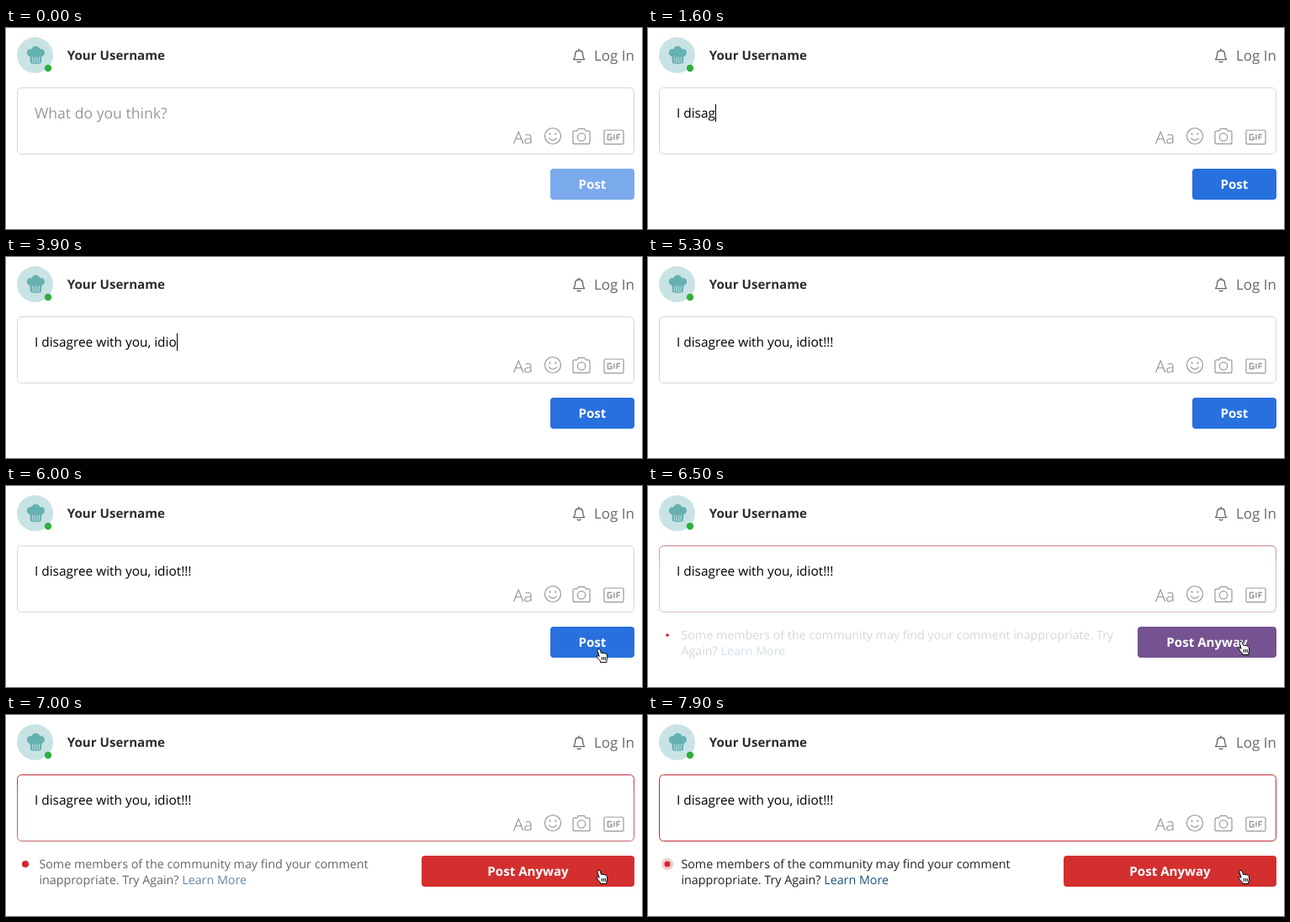
Animation of 756 by 240 pixels, one loop 8 s. Source, as an HTML page:

```html
<!DOCTYPE html>
<html lang="en">
<head>
<meta charset="utf-8">
<title>Comment box</title>
<style>
  html, body { margin: 0; width: 100%; height: 100%; overflow: hidden; background: #fff; }
  svg { display: block; width: 756px; height: 240px; }
  text { font-family: "Open Sans", "Noto Sans", sans-serif; text-rendering: geometricPrecision; white-space: pre; }
  .bold { font-weight: 700; font-size: 15.1px; }
  .icon { fill: none; stroke: #999; stroke-width: 1.2; stroke-linecap: round; stroke-linejoin: round; }
  #message { font-size: 14.3px; fill: #222; }
  #message .link { fill: #1c5480; }
</style>
</head>
<body>
<svg viewBox="0 0 756 240">
  <!-- header -->
  <circle cx="34.5" cy="32.5" r="21.5" fill="#c9e3e4"/>
  <g fill="#65b1b2">
    <circle cx="29.3" cy="29.5" r="4.6"/>
    <circle cx="35.3" cy="26.6" r="5.2"/>
    <circle cx="41.4" cy="29.5" r="4.6"/>
    <path d="M28 28H43L41.7 42Q35.3 44.2 29 42Z"/>
  </g>
  <path d="M31.4 34.5L32 41.5M34.2 34.5V42M36.8 34.5V42M39.6 34.5L39 41.5" stroke="#c9e3e4" stroke-width=".9"/>
  <circle cx="50" cy="48" r="4.2" fill="#2fae40"/>
  <text class="bold" x="72.8" y="38" fill="#2b2d31">Your Username</text>
  <path class="icon" style="stroke:#65686c;stroke-width:1.4" d="M681 25.3V27M674.6 37.6H687.6C685.8 35.9 685.6 34 685.6 31.4C685.6 28.6 683.7 27 681.1 27S676.6 28.6 676.6 31.4C676.6 34 676.4 35.9 674.6 37.6ZM679.2 40.1Q681.1 41.4 683 40.1"/>
  <text x="699" y="39" font-size="17" fill="#66696d">Log In</text>

  <!-- input -->
  <rect x="13.5" y="71.5" width="733" height="79" rx="5" fill="#fff" stroke="url(#edge)"/>
  <defs>
    <linearGradient id="edge" x1="0" y1="0" x2="0" y2="1">
      <stop id="edgeTop" offset="0"/>
      <stop id="edgeEnd" offset=".3"/>
    </linearGradient>
  </defs>
  <text id="hint" x="34" y="108" font-size="17.6" fill="#999">What do you think?</text>
  <text id="typed" x="34" y="107" font-size="15.4" fill="#000"></text>
  <rect id="caret" y="91" width="1" height="21" fill="#000"/>

  <!-- tools -->
  <text x="603" y="138" font-size="20.6" font-weight="300" fill="#888">Aa</text>
  <g class="icon">
    <circle cx="650" cy="129" r="9.5"/>
    <path d="M645.5 131.7Q650 136.4 654.5 131.7"/>
    <path d="M646.6 126.3V126.8M653.4 126.3V126.8" stroke-width="1.9"/>
    <path d="M676 122.8H679L680.4 120.3H687.6L689 122.8H692Q694 122.8 694 124.8V136.4Q694 138.4 692 138.4H676Q674 138.4 674 136.4V124.8Q674 122.8 676 122.8Z"/>
    <circle cx="684" cy="130.3" r="4.7"/>
    <rect x="711" y="122" width="23" height="16.6" rx="1.2"/>
    <path d="M719.8 127.2H715.4V133.4H719.8V130.6H718M722.9 127.2V133.4M726.2 133.6V127.2H730M726.2 130.4H729.4" stroke-width="1.5" stroke-linecap="butt"/>
  </g>

  <!-- footer -->
  <circle id="halo" cx="23" cy="178" fill="#d32f36"/>
  <circle id="dot" cx="23" cy="178" fill="#d0282f"/>
  <g id="message">
    <text id="line1" x="39.4" y="183"></text>
    <text x="39.4" y="202"><tspan id="line2"></tspan><tspan class="link">Learn More</tspan></text>
  </g>
  <rect id="button" y="168" height="37" rx="4"/>
  <text id="label" class="bold" y="192" text-anchor="middle" fill="#fff"></text>
  <path id="hand" d="M704 185.5Q705.8 185 706.4 187L707.6 190.5Q709 189.6 710 190.7Q711.4 189.9 712.3 191.2Q714 190.7 714.4 192.6Q715.3 196 714 198.6L713.8 201.5H706.6L706.3 199.6Q704 197.8 702.4 194.9Q702 193.2 703.6 193.2L705.2 194.4L703 187.6Q702.6 186 704 185.5ZM708.2 195V198.7M710.3 195V198.7M712.3 195V198.7" fill="#fff" stroke="#000" stroke-width="1" stroke-linejoin="round"/>
</svg>
<script>
  const LOOP = 8000;
  const TEXT = "I disagree with you, idiot!!!";
  // [time, characters visible from then on]
  const KEYS = [
    [600, 1], [1000, 3], [1100, 4], [1200, 5], [1400, 6], [1600, 7], [1700, 8], [1800, 9],
    [2000, 10], [2100, 11], [2200, 12], [2300, 14], [2400, 15], [2700, 16], [2900, 18], [3000, 19],
    [3300, 20], [3400, 21], [3600, 22], [3700, 23], [3800, 24], [3900, 25], [4000, 26],
    [4200, 27], [4300, 28], [4500, 29]
  ];
  const CLICK = 6200, RIGHT = 747;
  const PALE = [122, 170, 236], BLUE = [40, 112, 221], RED = [211, 47, 47];
  const GREY = [214, 214, 214], EDGE = [190, 42, 54];

  const el = {};
  document.querySelectorAll("[id]").forEach(node => el[node.id] = node);

  const ramp = (t, a, b) => Math.min(1, Math.max(0, (t - a) / (b - a)));
  const ease = p => p * p * (3 - 2 * p);
  const mix = (a, b, p) => a + (b - a) * p;
  const blend = (a, b, p) => `rgb(${a.map((v, i) => Math.round(mix(v, b[i], p)))})`;
  const set = (node, attrs) => { for (const k in attrs) node.setAttribute(k, attrs[k]); };
  const write = (node, s) => { if (node.textContent !== s) node.textContent = s; };
  const show = (node, on) => node.setAttribute("visibility", on ? "visible" : "hidden");

  function drawInput(t) {
    const count = KEYS.reduce((n, [time, chars]) => t >= time ? chars : n, 0);
    write(el.typed, TEXT.slice(0, count));
    show(el.hint, count === 0);
    const x = 34 + (count ? el.typed.getComputedTextLength() : 0);
    set(el.caret, { x: Math.round(x) });
    show(el.caret, (t >= 300 && t < 5000) || (t >= 5500 && t < 6000));
    set(el.edgeTop, { "stop-color": blend(GREY, EDGE, ramp(t, 6250, 6750)) });
    set(el.edgeEnd, { "stop-color": blend(GREY, EDGE, ramp(t, 6400, 7300)) });
  }

  function drawButton(t) {
    const warned = t >= CLICK;
    const width = warned ? mix(165, 253, ease(ramp(t, 6500, 6900))) : 100;
    const left = RIGHT - width;
    const fill = warned
      ? blend(BLUE, RED, ease(ramp(t, CLICK, 6850)))
      : blend(PALE, BLUE, ramp(t, 550, 700));
    set(el.button, { x: left, width, fill });
    set(el.label, { x: left + width / 2 });
    write(el.label, warned ? "Post Anyway" : "Post");
    return left;
  }

  function drawMessage(t, buttonLeft) {
    const wide = buttonLeft > 565;
    write(el.line1, "Some members of the community may find your comment" + (wide ? " inappropriate. Try" : ""));
    write(el.line2, wide ? "Again? " : "inappropriate. Try Again? ");
    set(el.message, { opacity: ramp(t, 6330, 7300) });
    const pulse = ramp(t, 7600, 7900);
    set(el.dot, { r: 4.1 * ramp(t, 6250, 6800) - 0.6 * pulse });
    set(el.halo, { r: mix(3.5, 7, pulse), opacity: pulse ? 0.25 : 0 });
  }

  function drawHand(t) {
    show(el.hand, t >= 5900);
    set(el.hand, { transform: `translate(0 ${14 * (1 - ease(ramp(t, 5900, 6150)))})` });
  }

  let start;
  function frame(now) {
    start ??= now;
    const t = (now - start) % LOOP;
    drawInput(t);
    drawMessage(t, drawButton(t));
    drawHand(t);
    requestAnimationFrame(frame);
  }
  requestAnimationFrame(frame);
</script>
</body>
</html>
```
